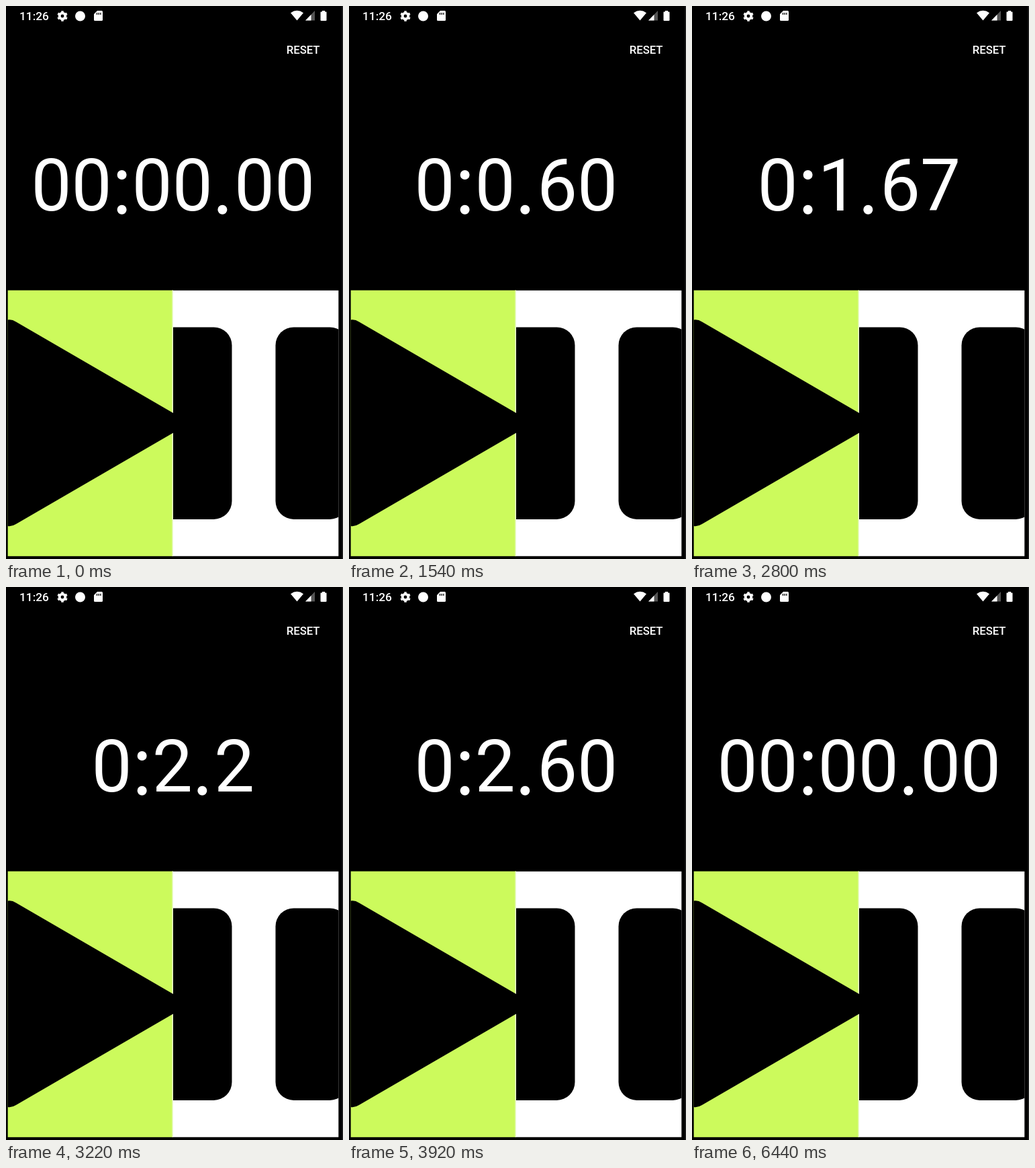
Write an HTML page that moves like this. It is 502 px wide and 822 px high and loops after 6930 ms.

```html
<!DOCTYPE html>
<html lang="en">
<head>
<meta charset="utf-8">
<title>Stopwatch</title>
<style>
  html, body { margin: 0; width: 100%; height: 100%; overflow: hidden; background: #000; }
  svg { display: block; }
  text { font-family: Roboto, sans-serif; fill: #fff; font-kerning: none; white-space: pre; }
  .label { font-weight: 500; }
  #time { font-size: 107px; }
  #time .mark { fill: none; }
</style>
</head>
<body>
<svg width="502" height="822" viewBox="0 0 502 822" fill="#fff">
  <rect width="502" height="822" fill="#000"/>
  <rect x="500.5" width="1.5" height="822" fill="#222"/>

  <!-- status bar -->
  <text class="label" x="20" y="21" font-size="17.3">11:26</text>
  <g fill="none" stroke="#fff">
    <circle cx="84" cy="15" r="4.3" stroke-width="3.8"/>
    <circle cx="84" cy="15" r="6.8" stroke-width="2" pathLength="12" stroke-dasharray="1" stroke-dashoffset="-.5"/>
  </g>
  <circle cx="110.5" cy="15" r="7.5"/>
  <path d="M136 7h6.5q1.5 0 1.5 1.5v12q0 1.500-1.500 1.500h-10q-1.500 0-1.500-1.500V12z"/>
  <path d="M135.500 10v3m2.700-3v3m2.700-3v3" stroke="#000" stroke-width="1.300"/>
  <path d="M433.500 21.500L424 10.200Q433.500 3.500 443 10.200z"/>
  <path d="M446 21.500H460V7z" fill="#555"/>
  <path d="M446 21.500H454.500V12.700z"/>
  <path d="M471 7h4v1.600h1.500q1 0 1 1V21q0 1-1 1h-7q-1 0-1-1V9.600q0-1 1-1H471z"/>
  <text class="label" x="467.5" y="71" font-size="16.8" text-anchor="end">RESET</text>

  <!-- stopwatch -->
  <text id="time" y="304.4"></text>
  <g id="dots">
    <circle cy="251" r="7"/>
    <circle cy="302.7" r="7"/>
    <circle cy="302.7" r="7"/>
  </g>

  <!-- start and pause buttons -->
  <rect x="2.7" y="422.6" width="246.3" height="395.2" fill="#ccfa5c"/>
  <rect x="247.4" y="422.6" width="1.6" height="395.2" fill="#eafac8"/>
  <path d="M2.700 466.500Q9 465.500 15 469.500L249 605V634.500L15 770Q9 774 2.700 773z" fill="#000"/>
  <svg x="249" y="422.6" width="246.3" height="395.2">
    <rect width="247" height="396"/>
    <g fill="#000">
      <rect x="-27" y="54.800" width="114.500" height="285.500" rx="27"/>
      <rect x="152.500" y="54.800" width="108" height="285.500" rx="27"/>
    </g>
  </svg>
</svg>
<script>
  const LOOP = 6930, TICK = 70, START = 840, RESET = 5880, CENTER = 248.8;
  const ADVANCE = { ':': 30, '.': 32.2 }, DIGIT = 60.1;
  // elapsed ms -> counted hundredths
  const COUNT = [[START, 0], [980, 12], [2030, 102], [2800, 167], [3220, 202], [3920, 260]];
  const time = document.getElementById('time');
  const [upper, lower, point] = document.getElementById('dots').children;
  let shown = '';

  function hundredths(t) {
    const i = COUNT.findIndex(([end]) => t < end);
    if (i < 0) return COUNT[COUNT.length - 1][1];
    const [t0, v0] = COUNT[i - 1], [t1, v1] = COUNT[i];
    return Math.round(v0 + (v1 - v0) * (t - t0) / (t1 - t0));
  }

  function reading(t) {
    if (t < START || t >= RESET) return '00:00.00';
    const n = hundredths(t);
    return `0:${Math.floor(n / 100)}.${n % 100}`;
  }

  function show(value) {
    if (value === shown) return;
    shown = value;
    const widths = [...value].map(c => ADVANCE[c] || DIGIT);
    let x = CENTER - widths.reduce((a, b) => a + b) / 2;
    time.innerHTML = [...value].map((c, i) => {
      const left = x;
      x += widths[i];
      if (c === ':') [upper, lower].forEach(dot => dot.setAttribute('cx', left + 15));
      if (c === '.') point.setAttribute('cx', left + 14.6);
      return `<tspan x="${left}"${ADVANCE[c] ? ' class="mark"' : ''}>${c}</tspan>`;
    }).join('');
  }

  const begin = performance.now();
  function frame() {
    const t = (performance.now() - begin) % LOOP;
    show(reading(Math.floor(t / TICK) * TICK));
    requestAnimationFrame(frame);
  }
  frame();
</script>
</body>
</html>
```
